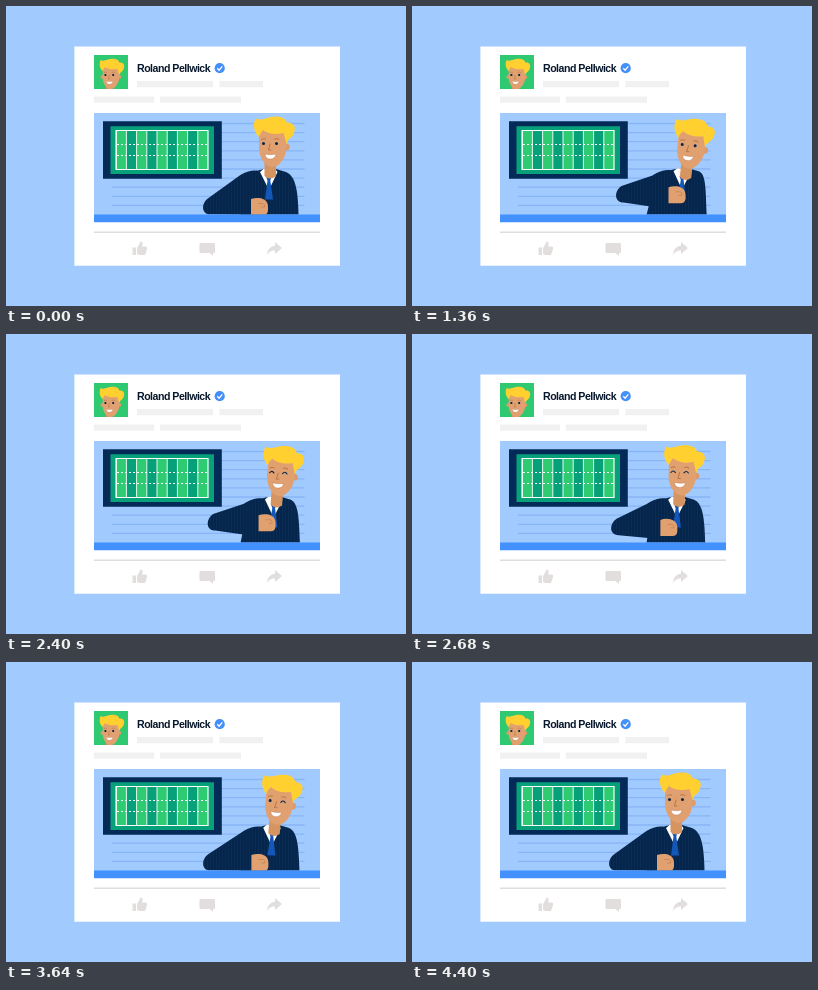
Write an HTML page that moves like this. It is 400 by 300 pixels and loops after 5.08 s.

```html
<!DOCTYPE html>
<html lang="en">
<head>
<meta charset="utf-8">
<title>Post</title>
<style>
  html, body { margin: 0; width: 100%; height: 100%; overflow: hidden; background: #a1caff; }
  svg { display: block; width: 100vw; height: 100vh; }
</style>
</head>
<body>
<svg viewBox="0 0 400 300">
  <defs>
    <clipPath id="avatarBox"><path d="M88 49h34v34h-34z"/></clipPath>
    <clipPath id="studio"><path d="M88 107h226v101.500h-226z"/></clipPath>
    <pattern id="cloth" width="3" height="3" patternUnits="userSpaceOnUse">
      <path fill="#05264c" d="M0 0h3v3h-3z"/><path fill="#0d2d56" d="M0 0h.7v3h-.7z"/>
    </pattern>
    <g id="face">
      <path fill="#d69461" d="M258.500 150h11.500v20q-6 5-11.500 0z"/>
      <circle cx="280.500" cy="141" r="3.300" fill="#dc9b68"/>
      <path fill="#e0a070" d="M253 121h27.500v21c0 8-6.500 19-14 19s-13.500-10-13.500-19z"/>
      <path fill="#ffd02f" d="M253 131C248 127 246 117 250 112.500C255 116 262 110 270 110.500C276 110.500 280 113 281 117C286 116 290 120 288.500 125C288 129 285 132 282 134L280.500 138L277.500 127C270 129 262 128 257 124q-3 3-4 7z"/>
      <path fill="none" stroke="#b97745" stroke-width="1" stroke-linecap="round" d="M255.500 133.500q2-1.500 4-.5M268.500 133q2.500-1.300 4.500.5M264 138l-1.500 6h2.500"/>
      <path fill="#fff" stroke="#b96c4b" stroke-width=".4" d="M259 148q5.500 1.500 11 0q-1 5-5.700 5t-5.300-5z"/>
    </g>
  </defs>

  <path fill="#a1caff" d="M0 0h400v300H0z"/>
  <path fill="#fff" d="M68.400 40.500h265.600v219.200H68.400z"/>
  <path fill="#2fc971" d="M88 49h34v34h-34z"/>
  <g clip-path="url(#avatarBox)">
    <g transform="translate(-55.100 -13.500) scale(.6)">
      <circle cx="252.500" cy="141" r="3.300" fill="#dc9b68"/>
      <use href="#face"/>
      <path fill="#08264d" d="M256 136h3v3h-3zM269 136h3v3h-3z"/>
    </g>
  </g>
  <text x="131" y="65.500" font-family="'Liberation Sans', Arial, sans-serif" font-weight="700" font-size="10.600" letter-spacing="-.5" fill="#07172c">Roland Pellwick</text>
  <circle cx="213.700" cy="62.200" r="5.100" fill="#458ff8"/>
  <path fill="none" stroke="#fff" stroke-width="1.300" d="M211.300 62.300l1.800 1.900 3.200-3.800"/>
  <path fill="#f1f1f1" d="M131 75h76v6.300h-76zM213.500 75h43.500v6.300h-43.500zM88 90.500h60v6.300h-60zM154 90.500h81v6.300h-81z"/>

  <path fill="#a1caff" d="M88 107h226v109h-226z"/>
  <path id="wall" stroke="#88b5f6" stroke-width="1.300"/>
  <path fill="#042b58" d="M97 115.300h118.800v57.400h-118.800z"/>
  <path fill="#06a079" d="M104.500 120.200h103.500v47.800h-103.500z"/>
  <g id="field"></g>
  <path fill="none" stroke="#fff" stroke-width="1.200" d="M110.200 124.500h91.800v39h-91.800z"/>
  <path stroke="#fff" stroke-width="1" stroke-dasharray="2 2" d="M111 138.500h91M111 149.500h91"/>

  <g clip-path="url(#studio)">
    <path id="torso" fill="url(#cloth)"/>
    <g id="chest">
      <path fill="#fff" d="M254 166l3.500-3h11.500l2.500 3-8.500 18z"/>
      <path fill="#1358b8" d="M260 170.500h5.500l-1.200 4 2.700 19h-8l2.500-19z"/>
    </g>
    <g id="head">
      <use href="#face"/>
      <g id="eyes" fill="#08264d" stroke="#08264d"></g>
    </g>
    <path id="arm" fill="url(#cloth)"/>
    <g id="hand">
      <path fill="#e0a070" d="M0-7.500q4-1.500 8-1c6 .5 9 4 9 9v3q0 5-5 5h-12z"/>
      <path fill="none" stroke="#c08150" stroke-width=".7" d="M7-3h5q2 1 1.500 3.500h-3.500"/>
    </g>
  </g>
  <path fill="#4391fe" d="M88 208.500h226v7.700h-226z"/>
  <path fill="#dfdddd" d="M88 225.500h226v1.600h-226z"/>
  <g fill="#e2dede">
    <path d="M126.500 241.500h3.500v7.500h-3.500zM131 242l3-5q0-2.500 1.500-1.500q2 1.500.5 5h4q1.500.3 1 2.500l-1.300 4.500q-.5 1.500-2 1.500h-4.500l-2.200-1z"/>
    <path d="M194.500 237h13.500q1 0 1 1v8q0 1-1 1h-1v3l-3.500-3h-9q-1 0-1-1v-8q0-1 1-1z"/>
    <path d="M269 236l7 6-7 6v-3.500q-5-.5-8 4.500q0-8 8-9.500z"/>
  </g>
</svg>
<script>
const $ = id => document.getElementById(id);
const LOOP = 5080;

let lines = '';
for (let i = 0; i < 10; i++) lines += `M106 ${117.5 + 9.1 * i}h192.500`;
$('wall').setAttribute('d', lines);

let stripes = '';
for (let i = 0; i < 9; i++) {
  const x = 110.2 + 10.2 * i;
  stripes += `<path fill="${i % 2 ? '#06a079' : '#2fcb73'}" d="M${x} 124.500h10.200v39h-10.200z"/>` +
    `<path stroke="#fff" stroke-width=".9" d="M${x} 124.500v39"/>`;
}
$('field').innerHTML = stripes;

const ease = (t, a, b) => {
  const p = Math.min(1, Math.max(0, (t - a) / (b - a)));
  return p * p * (3 - 2 * p);
};
const mix = (a, b, p) => a + (b - a) * p;
const pulse = (t, a, b, c, d) => ease(t, a, b) - ease(t, c, d);

const eye = (x, shut) => shut
  ? `<path fill="none" stroke-width="1.100" stroke-linecap="round" d="M${x - 2.2} 138.300q2.200-3 4.400 0"/>`
  : `<circle cx="${x}" cy="137.500" r="1.500" stroke="none"/>`;

function draw(t) {
  const lean = pulse(t, 400, 960, 1960, 3080);
  const lift = pulse(t, 400, 760, 2380, 3080);
  const fist = pulse(t, 440, 980, 2380, 3080);
  const nod = pulse(t, 3360, 3760, 3880, 4400);

  const headX = 9.5 * lean + 5 * nod;
  const headY = 1.5 * lean + 2 * nod;
  const tilt = 6 * lean + 6.5 * nod;
  $('head').setAttribute('transform', `translate(${headX} ${headY}) rotate(${tilt} 264 168)`);

  const dx = 7.5 * lean + 4 * nod;
  const dy = -.5 * lean;
  $('chest').setAttribute('transform', `translate(${dx} ${dy}) rotate(${tilt * .3} 264 168)`);
  $('torso').setAttribute('d',
    `M${250 + dx} ${165 + dy}L${258 + dx} ${163 + dy}L${270 + dx} ${163 + dy}L${280 + dx} ${166 + dy}` +
    `C${290 + dx * .6} ${170 + dy} ${292 + dx * .2} 186 ${292.5 + dx * .3} 209L234.500 209L${238 + dx * .5} 180z`);

  const ex = mix(198.5, 205.5, lean);
  const ey = mix(199.5, 187.5, lift);
  const hx = mix(245, 256.5, lean) + .5 * nod;
  const hy = mix(200.5, 188.8, fist);
  const sx = 251 + dx, sy = 164.5 + dy;
  $('arm').setAttribute('d',
    `M${sx} ${sy}C${sx - 8} ${sy} ${sx - 13} ${sy + 2} ${sx - 18} ${sy + 5.5}` +
    `L${ex + 4} ${ey - 7.5}C${ex - 4} ${ey - 2} ${ex - 3} ${ey + 9} ${ex + 6} ${ey + 9}` +
    `L${mix(238, 242, lean)} ${mix(209, 201, lift)}L${hx} ${hy + 8}V${hy - 7}L${sx + 6} ${sy + 18}z`);
  $('hand').setAttribute('transform', `translate(${hx} ${hy})`);

  const laugh = t > 2200 && t < 2720;
  const wink = t > 3520 && t < 4160;
  $('eyes').innerHTML = eye(257.5, laugh) + eye(270.5, laugh || wink);
}

const start = performance.now();
function tick() {
  const t = (performance.now() - start) % LOOP;
  draw(Math.floor(t / 40) * 40);
  requestAnimationFrame(tick);
}
tick();
</script>
</body>
</html>
```
